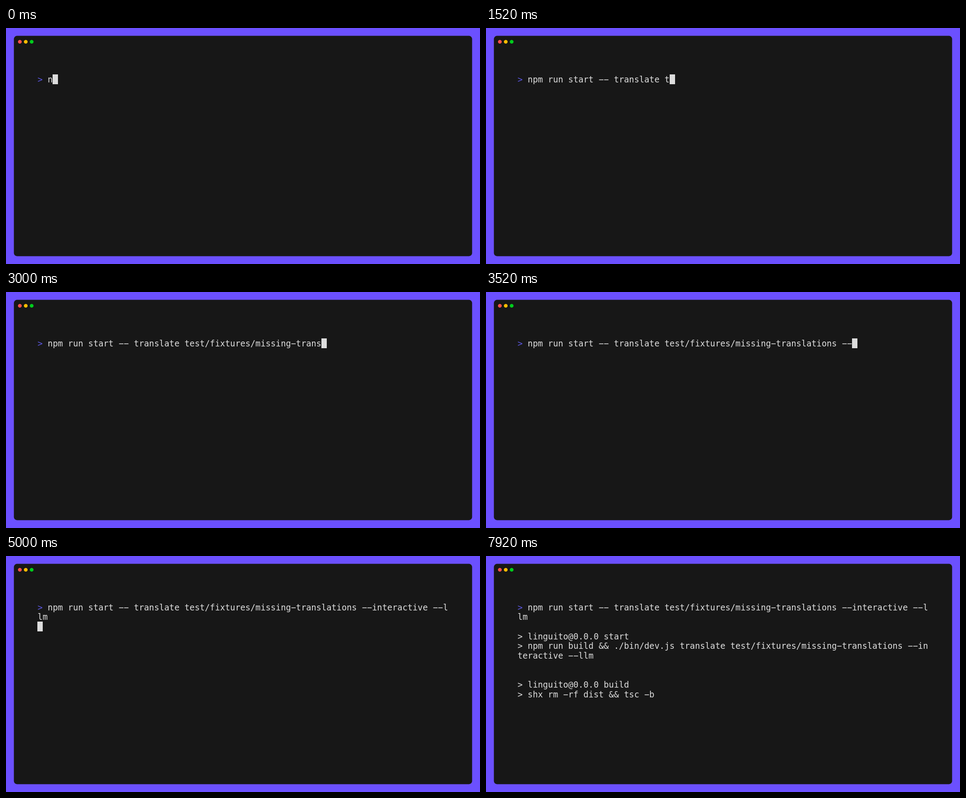
Write an HTML page with a canvas that moves like this. It is 1058 by 529 pixels and loops after 8000 ms.

```html
<!DOCTYPE html>
<html lang="en">
<head>
<meta charset="utf-8">
<title>Terminal</title>
<style>
  html, body { margin: 0; width: 100%; height: 100%; overflow: hidden; background: #6b50ff; }
  canvas { display: block; width: 1058px; height: 529px; }
</style>
</head>
<body>
<canvas id="stage" width="1058" height="529"></canvas>
<script>
const ctx = document.getElementById('stage').getContext('2d');

const LOOP = 8000, TICK = 40;
const LEFT = 70.5, TOP = 104, COL = 11.311, ROW = 21.72, COLS = 81;
const BASELINE = 17.6;
const FG = '#dddddd', PROMPT = '#5a56e0';

const COMMAND = 'npm run start -- translate test/fixtures/missing-translations --interactive --llm';
const START = ['> linguito@0.0.0 start',
  '> npm run build && ./bin/dev.js translate test/fixtures/missing-translations --interactive --llm'];
const BUILD = ['> linguito@0.0.0 build', '> shx rm -rf dist && tsc -b'];

// [characters typed, ms]; the pace drifts slightly between these
const PACE = [[2, 80], [32, 1740], [46, 2528], [81, 4424]];
const ENTER = 5000, START_AT = 5120, BUILD_AT = 5200;
const BLINKS = [5760, 6320, 6840, 7400, 7920];

function typedAt(t) {
  let n = 1;
  while (n < COMMAND.length && keyTime(n + 1) <= t) n++;
  return n;
}

function keyTime(n) {
  const i = PACE.findIndex((p, k) => k > 0 && n <= p[0]);
  const [n0, t0] = PACE[i - 1], [n1, t1] = PACE[i];
  return Math.ceil((t0 + (t1 - t0) * (n - n0) / (n1 - n0)) / TICK) * TICK;
}

// Writes a line from the given row, wrapping at the last column
function write(text, row) {
  [...text].forEach((ch, i) => {
    if (ch === ' ') return;
    ctx.fillStyle = row === 0 && i === 0 ? PROMPT : FG;
    const x = LEFT + (i % COLS) * COL;
    const y = TOP + (row + Math.floor(i / COLS)) * ROW + BASELINE;
    ctx.fillText(ch === '-' ? '\u2212' : ch, x, y);
  });
}

function cursor(col, row) {
  ctx.fillStyle = FG;
  ctx.fillRect(Math.round(LEFT + col * COL - 0.3), Math.round(TOP + row * ROW), 12, 22);
}

function dot(x, color) {
  ctx.fillStyle = color;
  ctx.beginPath();
  ctx.arc(x, 30.9, 4.2, 0, Math.PI * 2);
  ctx.fill();
}

function drawWindow() {
  ctx.fillStyle = '#6b50ff';
  ctx.fillRect(0, 0, 1058, 529);
  ctx.fillStyle = '#171717';
  ctx.beginPath();
  ctx.roundRect(17.6, 17.6, 1022.8, 493.8, 7);
  ctx.fill();
  dot(30.9, '#ff4f4d');
  dot(44.1, '#febb00');
  dot(57.3, '#00cc1d');
}

function draw(t) {
  drawWindow();
  ctx.font = '18.79px "DejaVu Sans Mono", monospace';
  const typed = typedAt(t);
  write('> ' + COMMAND.slice(0, typed), 0);

  if (t < ENTER) {
    const at = typed + 2;
    cursor(at % COLS, Math.floor(at / COLS));
    return;
  }
  let row = 2;
  if (t >= START_AT) {
    write(START[0], 3);
    write(START[1], 4);
    row = 7;
  }
  if (t >= BUILD_AT) {
    write(BUILD[0], 8);
    write(BUILD[1], 9);
    row = 11;
  }
  if (BLINKS.filter(b => b <= t).length % 2 === 0) cursor(0, row);
}

const begin = performance.now();
function frame() {
  draw((performance.now() - begin) % LOOP);
  requestAnimationFrame(frame);
}
frame();
</script>
</body>
</html>
```
